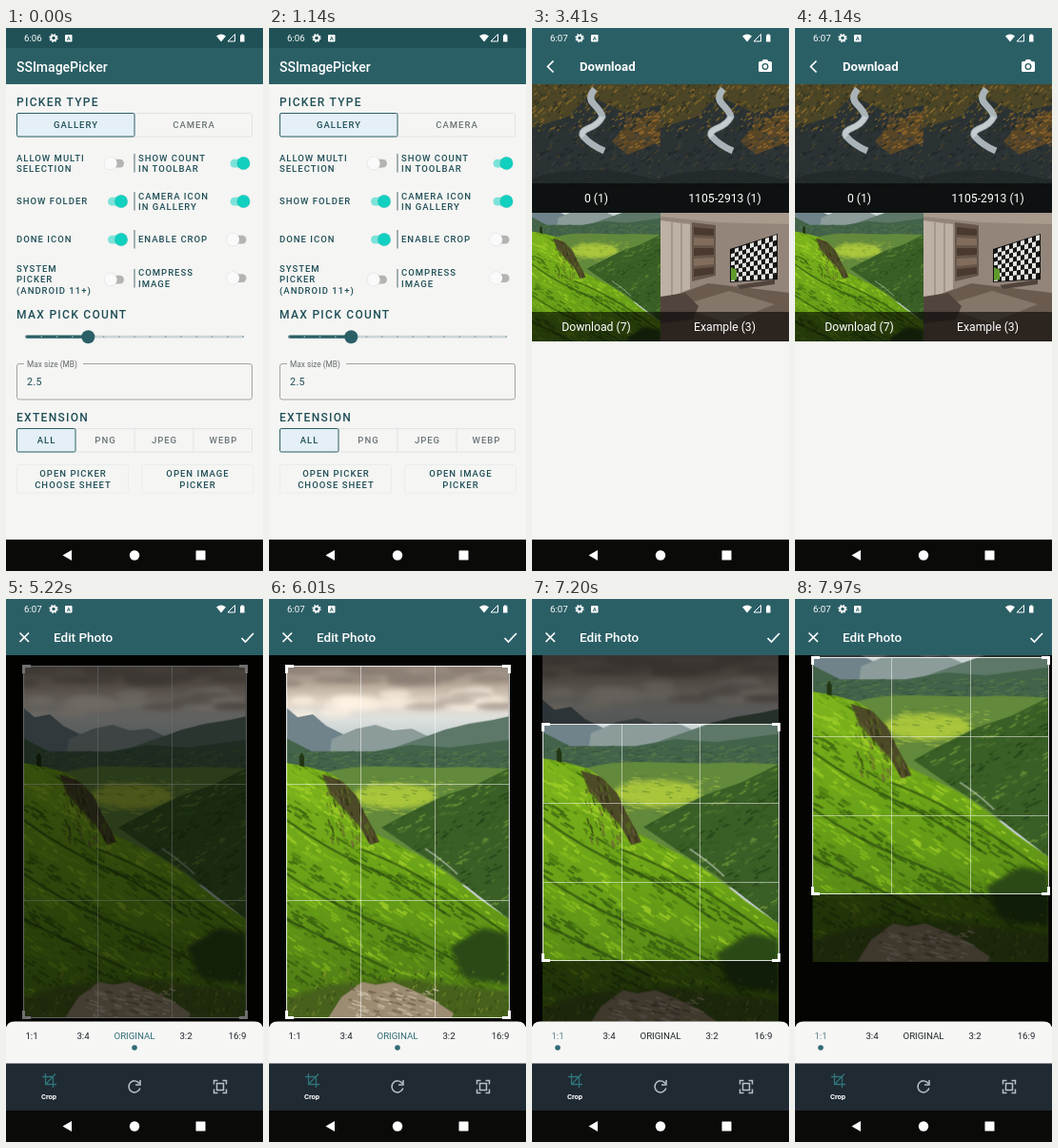
Recreate the animation shown at these times as an HTML page. Size 270x570 px, loop 8 s.

```html
<!DOCTYPE html>
<html lang="en">
<head>
<meta charset="utf-8">
<title>Image picker demo</title>
<style>
html, body { margin: 0; width: 100%; height: 100%; overflow: hidden; background: #0a0a08; }
#stage { position: relative; width: 270px; height: 570px; overflow: hidden; }
.layer { position: absolute; left: 0; top: 0; width: 270px; height: 570px; }
svg { display: block; }
text { font-family: Roboto, sans-serif; }
.caps { font-size: 9.5px; font-weight: 500; letter-spacing: 1px; fill: #1f4f57; }
.head { font-size: 12px; font-weight: 500; letter-spacing: 1.3px; fill: #1f4f57; }
.mid { text-anchor: middle; }
.quiet { fill: #6b7476; }
.tab { font-size: 9.7px; text-anchor: middle; fill: #20262a; }
.line { fill: none; stroke: #fff; stroke-width: 1.7; }

.anim, #crop, #photo { animation: 8s linear infinite both; }
.thumb { animation-name: thumb; }
.track { animation-name: track; }
#picker { animation-name: open-picker; }
#photos { animation-name: open-photos; }
#edit { animation-name: open-edit; }
#dim { animation-name: undim; background: #000; }
#photo { animation-name: photo; transform-origin: 135px 255px; }
.tab-old { animation-name: tab-old; }
.tab-new { animation-name: tab-new; }
.dot { animation-name: dot; }

#view { position: absolute; left: 0; top: 59px; width: 270px; height: 390px; overflow: hidden; background: #0a0a08; }
#view .layer { top: -59px; }
#crop {
  position: absolute; box-sizing: border-box; border: 1px solid #ffffffd0;
  box-shadow: 0 0 0 600px #0009; animation-name: crop;
}
#crop i { position: absolute; background: #ffffff80; }
#crop b { position: absolute; width: 6px; height: 6px; border: 0 solid #fff; }

@keyframes thumb {
  0%, 25% { transform: none; fill: #fafafa; }
  26.9%, 100% { transform: translateX(11px); fill: #12d0c0; }
}
@keyframes track { 0%, 25% { fill: #b4b4b2; } 26.9%, 100% { fill: #7ce3da; } }
@keyframes open-picker {
  0%, 37% { opacity: 0; transform: translateY(24px); animation-timing-function: ease-out; }
  40%, 100% { opacity: 1; transform: none; }
}
@keyframes open-photos { 0%, 52% { opacity: 0; } 53.3%, 100% { opacity: 1; } }
@keyframes open-edit {
  0%, 61% { opacity: 0; transform: translateY(24px); animation-timing-function: ease-out; }
  63.8%, 100% { opacity: 1; transform: none; }
}
@keyframes undim { 0%, 65.8% { opacity: .56; } 69%, 100% { opacity: 0; } }
@keyframes photo {
  0%, 84% { transform: none; animation-timing-function: ease-in-out; }
  88%, 93.2% { transform: scale(1.059); animation-timing-function: ease-in-out; }
  99.5%, 100% { transform: translate(7.5px, -70px) scale(1.059); }
}
@keyframes crop {
  0%, 84% { left: 17.5px; top: 11px; width: 235px; height: 370px; animation-timing-function: ease-in-out; }
  88%, 93.2% { left: 10.5px; top: 72px; width: 249px; height: 249px; animation-timing-function: ease-in-out; }
  99.5%, 100% { left: 18px; top: 2px; width: 249px; height: 249px; }
}
@keyframes tab-old { 0%, 83.7% { fill: #2f6b74; } 83.71%, 100% { fill: #20262a; } }
@keyframes tab-new { 0%, 83.7% { fill: #20262a; } 83.71%, 100% { fill: #5d8289; } }
@keyframes dot { 0%, 83.7% { transform: none; } 83.71%, 100% { transform: translateX(-108px); } }
</style>
</head>
<body>
<div id="stage"></div>
<script>
const TEAL = '#2b5f66', PAPER = '#f5f5f3';

let seed = 7;
const random = () => (seed = (seed * 16807) % 2147483647) / 2147483647;
const between = (a, b) => a + (b - a) * random();
const repeat = (n, f) => Array.from({ length: n }, (_, i) => f(i)).join('');

const rect = (x, y, w, h, fill, more = '') =>
  `<rect x="${x}" y="${y}" width="${w}" height="${h}" fill="${fill}" ${more}/>`;
const shape = (d, fill, more = '') => `<path d="${d}" fill="${fill}" ${more}/>`;
const circle = (x, y, r, fill, more = '') => `<circle cx="${x}" cy="${y}" r="${r}" fill="${fill}" ${more}/>`;
const label = (x, y, text, cls, more = '') => `<text x="${x}" y="${y}" class="${cls}" ${more}>${text}</text>`;
const line = (d, more = '') => `<path class="line" d="${d}" ${more}/>`;
const layer = (id, body) => `<svg class="layer anim" id="${id}" viewBox="0 0 270 570">${body}</svg>`;

// Short strokes scattered in a box; pick(x, y) chooses a palette index.
function dabs(n, [x0, y0, x1, y1], palette, pick, dx, dy, width, more = '') {
  const paths = palette.map(() => '');
  for (let i = 0; i < n; i++) {
    const x = between(x0, x1), y = between(y0, y1), k = between(.4, 1.3);
    const at = Math.max(0, Math.min(palette.length - 1, Math.floor(pick(x, y))));
    paths[at] += `M${x.toFixed(1)} ${y.toFixed(1)}l${(dx * k).toFixed(1)} ${(dy * k).toFixed(1)}`;
  }
  return `<g fill="none" stroke-width="${width}" ${more}>` +
    paths.map((d, i) => `<path d="${d}" stroke="${palette[i]}"/>`).join('') + '</g>';
}

const hill = 'M18 172L40 176 62 182 78 192 92 207 100 224 112 246 140 260 165 273 190 290 220 314 252 336V440H18Z';
const slope = 'M252 178L215 196 180 208 140 228 118 240 150 262 190 288 252 336Z';
const furrow = (x, y) => 2.2 + 1.7 * Math.sin((y - .62 * x) / 9 + Math.sin(x / 23)) + between(-.9, .9) - (y - 280) / 140;

const land = () => `<g id="land">
  ${rect(18, 70, 234, 370, 'url(#sky)')}
  <g filter="url(#soft)">
    ${repeat(16, () => `<ellipse cx="${between(18, 252)}" cy="${between(70, 90)}" rx="${between(12, 30)}" ry="4" fill="#85796f" opacity=".55"/>`)}
    ${repeat(14, () => `<ellipse cx="${between(18, 240)}" cy="${between(96, 122)}" rx="${between(10, 26)}" ry="5" fill="#fff3e4" opacity=".6"/>`)}
    ${repeat(5, () => `<ellipse cx="${between(150, 250)}" cy="${between(98, 114)}" rx="22" ry="4" fill="#a89c92" opacity=".6"/>`)}
  </g>
  ${shape('M18 114L30 124 46 121 60 133 78 142 96 140V180H18Z', '#70838a')}
  ${shape('M66 147L92 136 112 132 130 138 150 136 180 150V185H60Z', '#8b9c9a')}
  ${shape('M120 160L160 146 185 137 210 131 235 127 252 123V200H118Z', '#5d7868')}
  ${shape('M18 146L45 160 75 160 110 160 150 153 190 156 252 148V260H18Z', '#43634a')}
  ${dabs(260, [20, 160, 252, 185], ['#35543c', '#5d7c48'], () => between(0, 2), 6, -1, 1.2, 'opacity=".7"')}
  ${shape('M50 186C90 168 150 180 200 176L252 178V300H90Z', '#63893c')}
  <ellipse cx="132" cy="207" rx="44" ry="13" fill="#a9c53b" filter="url(#soft)"/>
  ${dabs(120, [85, 186, 190, 228], ['#4f7a32', '#8fb33c', '#c0d24a'], () => between(0, 3), 7, 1, 1, 'opacity=".6"')}
  ${shape(slope, '#3a5f26')}
  <g clip-path="url(#slope)">${dabs(420, [115, 178, 252, 335], ['#24411a', '#33561f', '#4c7530', '#6d9438'],
    (x, y) => 1.8 + 1.2 * Math.sin((y + .6 * x) / 10) + between(-1, 1), 6, -3, 1.7, 'opacity=".8"')}</g>
  ${line('M164 262Q185 276 198 289', 'stroke="#c5c9bf" opacity=".45"')}
  ${shape(hill, 'url(#grass)')}
  <g clip-path="url(#hill)">
    ${dabs(1500, [10, 170, 252, 440], ['#33590f', '#4b7c12', '#68a018', '#86bd1d', '#a5d32a'], furrow, 8, 5, 2, 'opacity=".75"')}
    ${shape('M56 184L78 191 92 206 103 227 116 255 106 258 96 240 80 222 64 205Z', '#4d4a28')}
    ${dabs(90, [60, 188, 112, 256], ['#2e3016', '#6c6038', '#59731f'], () => between(0, 3), 2, 7, 1.6, 'opacity=".7"')}
    <g fill="none" stroke="#29480f" stroke-width="2.4" opacity=".65">
      <path d="M18 232Q60 262 100 280T185 330"/><path d="M18 288Q60 318 110 338T205 385"/><path d="M18 336Q70 362 125 388"/><path d="M95 262Q160 285 250 352"/>
    </g>
    <g filter="url(#soft)">${shape('M190 365L225 345 252 352V405L205 398Z', '#2c4813')}
    ${shape('M18 418L70 404 150 400 252 412V440H18Z', '#46601b')}</g>
    ${dabs(200, [18, 392, 252, 440], ['#2f4612', '#5f7e20', '#87952f'], () => between(0, 3), 2, -4, 1.3, 'opacity=".7"')}
  </g>
  ${shape('M62 440L76 418 98 402 112 405 130 402 152 411 172 420 194 435 192 440Z', '#9c8c72')}
  ${dabs(80, [80, 408, 172, 438], ['#6a5c45', '#bcae95', '#d0c4ad'], () => between(0, 3), 8, 2.5, 1.8, 'opacity=".7"')}
  ${shape('M32 175V165L34.5 161 37 166V176Z', '#223613')}
</g>`;

const river = () => `<g id="river">
  ${rect(0, 0, 135, 135, '#2b3234')}
  ${shape('M0 0H135V22L98 30 60 12 38 34 0 46Z', '#4c4526')}
  ${shape('M135 28L100 42 84 60 100 74 135 60Z', '#594626')}
  ${dabs(300, [0, 0, 135, 50], ['#2b2d20', '#6d5a27', '#8f6c2a', '#3c4227'], () => between(0, 4), 3, -3, 1.7, 'opacity=".75"')}
  ${dabs(320, [0, 40, 135, 135], ['#1e2629', '#353d3d', '#46412c'], () => between(0, 2.7), 4, -3, 1.8, 'opacity=".75"')}
  ${dabs(70, [88, 30, 135, 68], ['#a0702b', '#77552a'], () => between(0, 2), 4, -2, 1.7, 'opacity=".7"')}
  <path d="M66 5Q58 14 65 21T74 34Q70 42 60 46T54 55Q62 64 76 70" fill="none" stroke="#a9b3b8" stroke-width="7" stroke-linejoin="round"/>
  <path d="M74 34Q70 42 60 46T54 55" fill="none" stroke="#c5ccd0" stroke-width="5"/>
  ${shape('M0 98Q70 80 135 102V135H0Z', '#202729', 'opacity=".7"')}
</g>`;

function screenChecks() {
  const point = (u, v) => `${74 + 48 * u} ${39 - 16 * u + v * (33 + 13 * u)}`;
  return repeat(96, i => {
    const c = i % 12, r = Math.floor(i / 12);
    const [u, v, U, V] = [c / 12, r / 8, (c + 1) / 12, (r + 1) / 8];
    return shape(`M${point(u, v)}L${point(U, v)} ${point(U, V)} ${point(u, V)}Z`, (c + r) % 2 ? '#e4e4e0' : '#161616');
  });
}

const room = () => `<g id="room">
  ${rect(0, 0, 135, 135, '#94857a')}
  ${shape('M0 0H135V12L60 10 0 4Z', '#a89a8d')}
  ${shape('M0 8L31 12V80L0 92Z', '#bdb1a5')}
  ${shape('M12 10V88M22 11V84', 'none', 'stroke="#a3968b" stroke-width="2"')}
  ${shape('M33 10L58 13V66L33 72Z', '#66564a')}
  ${repeat(5, i => shape(`M35 ${15 + i * 11}L56 ${17 + i * 10}V${24 + i * 10}L35 ${23 + i * 11}Z`, i % 2 ? '#826d5c' : '#49392f'))}
  ${shape('M0 92L50 74 135 84V135H0Z', '#6b5b4f')}
  ${shape('M20 98L72 82 120 96 70 116Z', '#85766a')}
  ${shape('M0 88L26 84 40 98 34 112 0 116Z', '#51443c')}
  ${shape('M80 76L120 70V75L84 80Z', '#51443c')}
  ${shape('M73 38L123 22V70L73 73Z', '#111')}
  ${screenChecks()}
  ${shape('M74 57L80 60V70L74 71Z', '#5f9a2c')}
</g>`;

const boxes = { land: '18 70 234 370', river: '0 0 135 135', room: '0 0 135 135' };
const picture = (id, x, y, w, h = w) =>
  `<svg x="${x}" y="${y}" width="${w}" height="${h}" viewBox="${boxes[id]}" preserveAspectRatio="xMidYMid slice"><use href="#${id}"/></svg>`;

const status = time => `
  ${label(19, 14, time, '', 'fill="#fff" font-size="9.7"')}
  <circle cx="50" cy="10.500" r="2.700" fill="none" stroke="#fff" stroke-width="1.800"/>
  <circle cx="50" cy="10.500" r="4" fill="none" stroke="#fff" stroke-width="1.300" stroke-dasharray="1.600 1.540"/>
  ${rect(62, 7, 7.5, 7.5, '#fff', 'rx="1"')}
  ${label(65.7, 13, 'A', 'mid', `fill="${TEAL}" font-size="6" font-weight="700"`)}
  ${shape('M221 8.500Q226 4.500 231 8.500L226 14.500Z', '#fff')}
  ${shape('M233 14L240.500 6.500V14Z', 'none', 'stroke="#fff"')}
  ${shape('M246 7.500H247V6.500H249.500V7.500H250.500V14.500H246Z', '#fff')}`;

const header = (time, title, weight, size) =>
  rect(0, 0, 270, 59, TEAL) + status(time) +
  label(50, 45, title, '', `fill="#fff" font-size="${size}" font-weight="${weight}"`);

const nav = rect(0, 537, 270, 33, '#0a0a08') + shape('M59.500 553.500L69 548V559Z', '#fff') +
  circle(135, 553.5, 5.2, '#fff') + rect(199.5, 548.5, 10, 10, '#fff', 'rx=".5"');

function toggle(x, y, state) {
  const on = state === 'on', live = state === 'flip';
  return rect(x - 3, y - 4.2, 17, 8.6, on ? '#7ce3da' : '#b4b4b2', `rx="4.3" ${live ? 'class="anim track"' : ''}`) +
    circle(on ? x + 11 : x, y, 6.8, on ? '#12d0c0' : '#fafafa', `stroke="#0000000f" ${live ? 'class="anim thumb"' : ''}`);
}

const lines = (x, y, list, cls, step = 12) =>
  list.map((s, i) => label(x, y + 3.4 + (i - (list.length - 1) / 2) * step, s, cls)).join('');

const options = [
  [11, 142, ['ALLOW MULTI', 'SELECTION'], 'off'], [139, 142, ['SHOW COUNT', 'IN TOOLBAR'], 'on'],
  [11, 182, ['SHOW FOLDER'], 'on'], [139, 182, ['CAMERA ICON', 'IN GALLERY'], 'on'],
  [11, 222, ['DONE ICON'], 'on'], [139, 222, ['ENABLE CROP'], 'flip'],
  [11, 264, ['SYSTEM', 'PICKER', '(ANDROID 11+)'], 'off'], [139, 262.5, ['COMPRESS', 'IMAGE'], 'off']
];

// A row of joined buttons, the first one chosen.
function segments(y, names) {
  const w = 248 / names.length, pale = 'stroke="#e0e4e4"';
  return rect(11.5, y, 247, 24.5, 'none', pale + ' rx="2"') +
    names.map((name, i) => (i > 1 ? shape(`M${11 + i * w} ${y}v24.500`, 'none', pale) : '') +
      (i ? '' : rect(11.5, y, w - .5, 24.5, '#e4f0f6', `stroke="${TEAL}" rx="1.5"`)) +
      label(11.5 + (i + .5) * w, y + 15.8, name, 'caps mid' + (i ? ' quiet' : ''))).join('');
}

const button = (x, text) =>
  rect(x, 458.5, 117, 29.5, 'none', 'stroke="#eaeded" rx="2"') + lines(x + 59, 474, text, 'caps mid');

const settings = layer('settings', `
  ${rect(0, 0, 270, 570, PAPER)}${rect(0, 0, 270, 59, TEAL)}${rect(0, 0, 270, 21, '#1f5156')}
  ${status('6:06')}
  ${label(11, 45.5, 'SSImagePicker', '', 'fill="#fff" font-size="14" font-weight="500"')}
  ${label(11, 81.5, 'PICKER TYPE', 'head')}${segments(89.5, ['GALLERY', 'CAMERA'])}
  ${options.map(([x, y, text, state]) => lines(x, y, text, 'caps', 11.8) + toggle(x < 99 ? 110 : 238.5, y, state)).join('')}
  ${[132, 172, 212, 253].map(y => rect(134.2, y, 1.5, 19.5, '#87999c')).join('')}
  ${label(11, 304.5, 'MAX PICK COUNT', 'head')}
  ${rect(20, 322.8, 230, 2.6, '#cbd5d8', 'rx="1.3"')}${rect(20, 322.5, 66, 3.2, TEAL, 'rx="1.6"')}
  ${repeat(15, i => circle(21 + i * 16.3, 324.1, .9, i < 4 ? '#8fabb0' : '#8ea3a8'))}
  ${circle(86.3, 324.3, 7, TEAL)}
  ${rect(11.5, 352.5, 247, 37.5, 'none', 'stroke="#a3a39f" rx="2.5"')}${rect(19, 350, 62, 5, PAPER)}
  ${label(22, 356, 'Max size (MB)', '', 'fill="#666c6e" font-size="8.3"')}
  ${label(22, 375.3, '2.5', '', 'fill="#1f4f57" font-size="10.7" letter-spacing=".4"')}
  ${label(11, 412.5, 'EXTENSION', 'head')}${segments(420.5, ['ALL', 'PNG', 'JPEG', 'WEBP'])}
  ${button(11.5, ['OPEN PICKER', 'CHOOSE SHEET'])}${button(142.5, ['OPEN IMAGE', 'PICKER'])}
  ${nav}`);

const folder = (id, x, y, name) => picture(id, x, y, 135) + rect(x, y + 104, 135, 31, '#0009') +
  label(x + 67.5, y + 124.3, name, 'mid', 'fill="#fff" font-size="12.2"');

const picker = layer('picker', `
  ${rect(0, 0, 270, 570, PAPER)}${header('6:07', 'Download', 700, 13.2)}
  ${line('M22.500 34.500L16.500 40.500L22.500 46.500')}
  ${shape('M238 36.500Q238 35 239.500 35H241.500L243 33H247L248.500 35H250.500Q252 35 252 36.500V44.500Q252 46 250.500 46H239.500Q238 46 238 44.500Z', '#fff')}
  <circle cx="245" cy="40.500" r="2.800" fill="#fff" stroke="${TEAL}" stroke-width="1.300"/>
  ${folder('river', 0, 59, '0 (1)')}${folder('river', 135, 59, '1105-2913 (1)')}
  ${folder('land', 0, 194, 'Download (7)')}${folder('room', 135, 194, 'Example (3)')}
  ${nav}`);

const photos = layer('photos', rect(0, 59, 270, 478, PAPER) +
  ['land', 'river', 'room', 'river', 'land', 'room', 'river']
    .map((id, i) => picture(id, i % 3 * 90, 59 + Math.floor(i / 3) * 90, 89.5)).join(''));

const tabs = ['1:1', '3:4', 'ORIGINAL', '3:2', '16:9'];
const tabClass = { '1:1': ' anim tab-new', ORIGINAL: ' anim tab-old' };

const editPanel = `<svg class="layer" viewBox="0 0 270 570">
  ${header('6:07', 'Edit Photo', 500, 13.5)}
  ${line('M14.500 35.500L24 45M24 35.500L14.500 45')}${line('M247.500 41L251.500 45L260 36')}
  ${shape('M0 500V452Q0 443.500 9 443.500H261Q270 443.500 270 452V500Z', '#f6f6f5')}
  ${tabs.map((name, i) => label(27 + i * 54, 462.3, name, 'tab' + (tabClass[name] || ''))).join('')}
  ${circle(135, 471, 2.8, '#2f6b74', 'class="anim dot"')}
  ${rect(0, 487.5, 270, 50, '#202a33')}
  <g fill="none" stroke="#2f7378" stroke-width="1.300"><path d="M41.500 498V509.500H53M38 501.500H49.500V513M41.500 509.500L52 498.500"/></g>
  ${label(45, 525, 'Crop', 'mid', 'fill="#fff" font-size="7.600" font-weight="700"')}
  <g fill="none" stroke="#b9c0c4" stroke-width="1.500">
    <path d="M140 508.500A6 6 0 1 0 140.800 513.500M141 505V510H136"/>
    <path d="M218.500 509.500V505.500H222.500M227.500 505.500H231.500V509.500M231.500 514.500V518.500H227.500M222.500 518.500H218.500V514.500M221.500 508.500H228.500V515.500H221.500Z"/>
  </g>
  ${nav}</svg>`;

const corners = ['top left', 'top right', 'bottom left', 'bottom right'].map(pair =>
  `<b style="${pair.split(' ').map(s => `${s}:-2px;border-${s}-width:3px`).join(';')}"></b>`).join('');
const grid = ['33.33%', '66.67%'].map(p =>
  `<i style="left:${p};top:0;width:1px;height:100%"></i><i style="top:${p};left:0;height:1px;width:100%"></i>`).join('');

const edit = `<div class="layer anim" id="edit">
  <div id="view">
    <svg class="layer" viewBox="0 0 270 570"><g id="photo">${picture('land', 18, 70, 234, 370)}</g></svg>
    <div id="crop">${grid}${corners}</div>
    <div class="layer anim" id="dim"></div>
  </div>${editPanel}</div>`;

const stops = list => list.map(([at, color]) => `<stop offset="${at}" stop-color="${color}"/>`).join('');
const gradient = (id, y1, y2, list) =>
  `<linearGradient id="${id}" gradientUnits="userSpaceOnUse" x1="0" x2="0" y1="${y1}" y2="${y2}">${stops(list)}</linearGradient>`;

const defs = `<svg width="0" height="0" style="position:absolute"><defs>
  ${gradient('sky', 70, 145, [[0, '#93877d'], [.25, '#b5a697'], [.5, '#e4d7c8'], [.75, '#dde0de'], [1, '#c5d0d1']])}
  ${gradient('grass', 172, 440, [[0, '#7fb51d'], [.5, '#68a018'], [1, '#4a7415']])}
  <filter id="soft"><feGaussianBlur stdDeviation="2.500"/></filter>
  <clipPath id="hill"><path d="${hill}"/></clipPath><clipPath id="slope"><path d="${slope}"/></clipPath>
  ${land()}${river()}${room()}</defs></svg>`;

document.getElementById('stage').innerHTML = defs + settings + picker + photos + edit;
</script>
</body>
</html>
```
